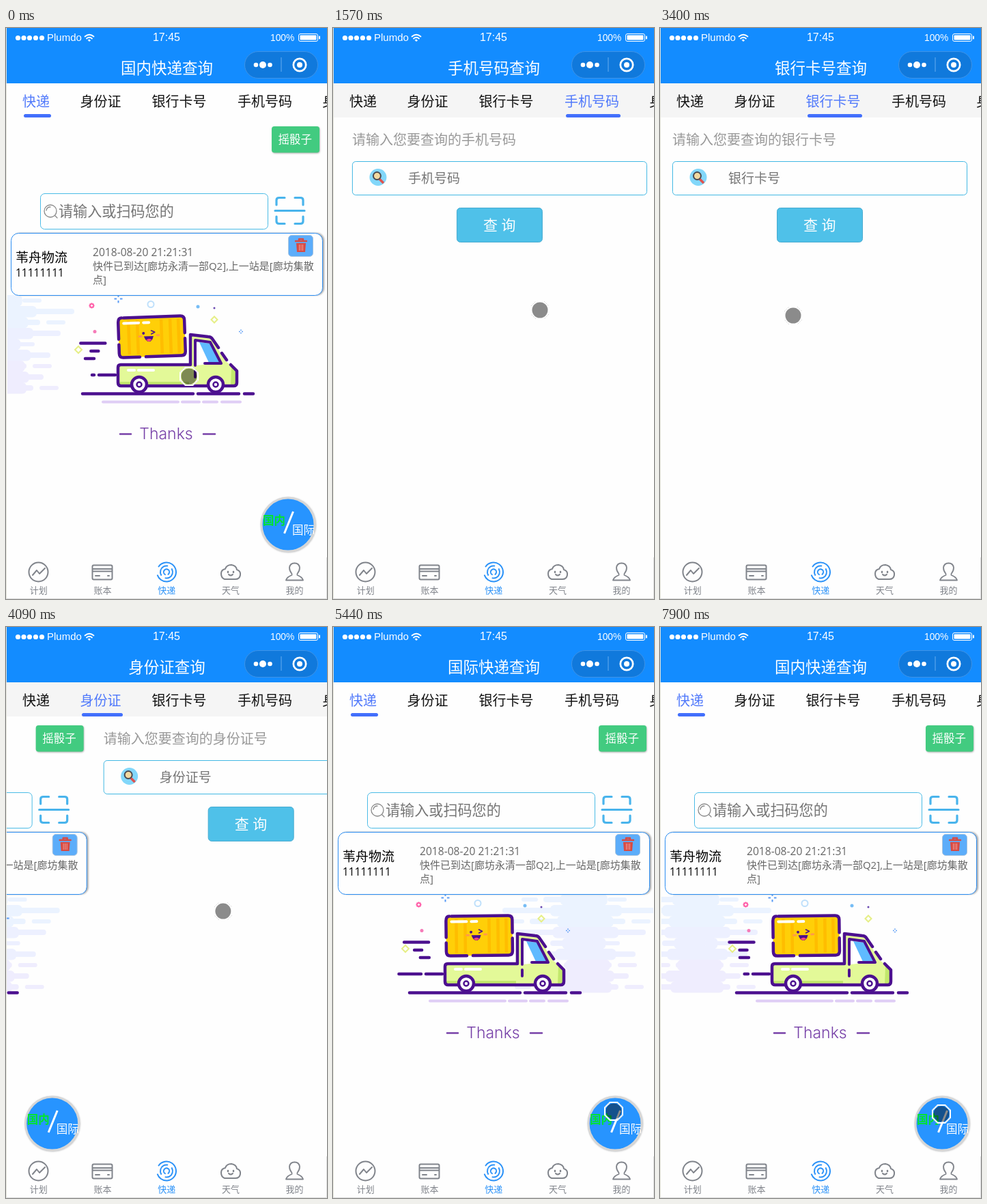
An HTML page that plays this animation: 470 by 836 pixels, repeating every 8 s.

```html
<!DOCTYPE html>
<html lang="zh">
<head>
<meta charset="utf-8">
<style>
html, body { margin: 0; width: 100%; height: 100%; overflow: hidden; background: #fefefe; }
svg { display: block; width: 470px; height: 836px; font-family: 'Open Sans', 'Noto Sans CJK SC', 'Noto Sans CJK', sans-serif; }
.bar { font-family: 'Liberation Sans', sans-serif; fill: #fff; }
.line { fill: none; stroke-linecap: round; stroke-linejoin: round; }
</style>
</head>
<body>
<svg viewBox="0 0 470 836">
  <defs>
    <clipPath id="view"><rect x="1" y="131" width="469" height="644"/></clipPath>
    <clipPath id="art"><rect x="2" y="391" width="467" height="180"/></clipPath>
    <filter id="soft" x="-20%" y="-20%" width="140%" height="140%"><feGaussianBlur stdDeviation="1.2"/></filter>
  </defs>
  <rect width="470" height="836" fill="#fefefe"/>

  <g clip-path="url(#view)"><g id="pages">
    <g clip-path="url(#art)">
      <g id="cloud"></g>
      <g id="sparks"></g>
    </g>
    <g id="truck" class="line" stroke="#4c108f" stroke-width="4.5">
      <path id="speed"/>
      <path d="M112 535.5H274M281 535.5H341M349 535.5H362"/>
      <path d="M142 547.5H252M258 547.5H283M289 547.5H309M316 547.5H343" stroke="#dfcdf5" stroke-width="4"/>
      <path d="M164 494H270V449L299 453Q311 470 322 488L338 501V524H164Z" fill="#e3f998" stroke="none"/>
      <path d="M166 518H268V524H166ZM330 497L338 501V524H329Z" fill="#c2e86c" stroke="none"/>
      <path d="M183 524H168Q164 524 164 519V497Q164 493 168 493H269M208 524H294M320 524H334Q338 524 338 519V502L329 493M323 486L316 476M311 468L302 455Q300 452 296 452L270 449V493"/>
      <path d="M278 458L299 461L314 490L279 494Z" fill="#fff" stroke="none"/>
      <path d="M283 460L299 462L312 489L298 492Z" fill="#5fbaff" stroke="none"/>
      <path d="M277 494V457L299 460L315 491H291M277 502V511" stroke-width="4"/>
      <path d="M179 501H188M194 501H216" stroke="#fff" stroke-width="4"/>
      <g fill="#fff"><circle cx="195" cy="522" r="11"/><circle cx="307" cy="522" r="11"/></g>
      <g fill="#fff" stroke-width="2.5"><circle cx="195" cy="522" r="3.5"/><circle cx="307" cy="522" r="3.5"/></g>
      <g id="box">
        <rect x="166" y="423" width="97" height="58" rx="3" fill="#ffcf08" stroke="none"/>
        <path d="M181 427V477M194 427V477M229 427V477M242 427V477M254 427V477" stroke="#ffbd00" stroke-linecap="butt"/>
        <path d="M174 423H257Q263 423 263 429V448M263 456V475Q263 481 257 481H205M196 481H172Q166 481 166 475V462M166 454V430Q166 423 171 423"/>
        <path d="M174 431H196M203 431H211" stroke="#fff" stroke-width="4"/>
        <path d="M214 443L219 445.500L214 448" stroke-width="1.6"/>
        <circle cx="202.500" cy="446.500" r="2" fill="#4c108f" stroke="none"/>
        <path d="M203 451H217Q215 459 210 459Q205 458 203 451Z" fill="#4c108f" stroke="none"/>
        <path d="M206 456.500Q211 453 214.500 456.500L210 459Z" fill="#ff4d79" stroke="none"/>
        <path d="M196 451H199M222 450H225" stroke="#ff9a4a" stroke-width="3"/>
      </g>
    </g>
    <path d="M167 594.5H183M289 594.5H306" class="line" stroke="#7740a8" stroke-width="2.6"/>
    <text x="234.5" y="601.5" font-size="23" font-weight="300" text-anchor="middle" fill="#7740a8" style="font-family:Inter,sans-serif">Thanks</text>

    <rect x="390" y="145" width="69.500" height="38.500" rx="4" fill="#aaa" filter="url(#soft)"/>
    <rect x="389" y="144" width="70" height="38.5" rx="4" fill="#42cb80"/>
    <text x="398.5" y="169" font-size="16.5" fill="#fff">摇骰子</text>

    <g id="firm">
      <text x="128" y="231" font-size="24">国际快递公司:</text>
      <text x="274" y="231" font-size="24" font-weight="700" fill="#83b8f0">ZKU</text>
      <path d="M274 234H323" stroke="#83b8f0" stroke-width="2"/>
      <path d="M324 217H342L333 227Z" fill="#4bb9e9"/>
    </g>
    <g class="line">
      <rect x="50.5" y="242.5" width="333" height="52" rx="6" stroke="#4abbe6"/>
      <g stroke="#888" stroke-width="1.3"><circle cx="65" cy="268" r="9"/><path d="M71.500 274.500L75 278M59 267Q60 262 65 262"/></g>
      <path d="M396 259V252Q396 248.500 400 248.500H408M423 248.500H431Q435 248.500 435 252V259M396 276V283Q396 286.500 400 286.500H408M423 286.500H431Q435 286.500 435 283V276M394 267.500H437" stroke="#49b4ec" stroke-width="3.2"/>
    </g>
    <text x="77" y="276" font-size="21.1" fill="#757575">请输入或扫码您的</text>

    <rect x="10" y="300" width="456" height="91.500" rx="11" fill="#aaa" filter="url(#soft)"/>
    <rect x="7.500" y="300.500" width="456" height="91" rx="11" fill="#fefefe" stroke="#2a8df2"/>
    <text x="14" y="343" font-size="19">苇舟物流</text>
    <text x="14" y="364" font-size="15.5">11111111</text>
    <g font-size="15" fill="#666">
      <text x="127" y="334" font-size="15.6">2018-08-20 21:21:31</text>
      <text x="127" y="354">快件已到达[廊坊永清一部Q2],上一站是[廊坊集散</text>
      <text x="127" y="374">点]</text>
    </g>
    <rect x="413.500" y="303.500" width="36" height="31" rx="5" fill="#5cadfa" stroke="#a9c4de"/>
    <path d="M424 312H440M429 311V309H435V311" class="line" stroke="#d84b43" stroke-width="2.4"/>
    <path d="M425 315H439L438 328H426Z" fill="#d84b43"/>
    <path d="M429.500 317V326M432 317V326M434.500 317V326" stroke="#f0a09a"/>

    <circle cx="413.500" cy="727.500" r="40.500" fill="#bbb" filter="url(#soft)"/>
    <circle cx="413" cy="727" r="39" fill="#2794ff" stroke="#d6d6d6" stroke-width="3"/>
    <path d="M420.500 708L407.500 740" stroke="#fff" stroke-width="3"/>
    <g font-size="16.5"><text id="home" x="376" y="727">国内</text><text id="abroad" x="419" y="741">国际</text></g>
    <g id="forms"></g>
  </g></g>

  <rect x="1" width="469" height="81" fill="#138cff"/>
  <g id="signal" fill="#fff"></g>
  <g class="bar">
    <text x="60" y="19" font-size="15">Plumdo</text>
    <text x="235" y="19" font-size="16" text-anchor="middle">17:45</text>
    <text x="387" y="19" font-size="13.800">100%</text>
  </g>
  <g class="line" stroke="#fff">
    <path d="M115.500 12.500Q122 7 128.500 12.500M118 15.500Q122 12 126 15.500" stroke-width="1.800"/>
    <path d="M120.500 18L122 19.500L123.500 18L122 17Z" fill="#fff"/>
    <rect x="428.500" y="8.500" width="28" height="11" rx="2.500"/>
    <rect x="430.500" y="10.500" width="24" height="7" rx="1" fill="#fff" stroke="none"/>
    <path d="M459 12.500V15.500" stroke-width="2"/>
  </g>
  <text id="title" x="235.500" y="67" font-size="22.5" font-weight="500" text-anchor="middle" fill="#fff"></text>
  <rect x="349.500" y="34.500" width="107" height="39" rx="19.500" fill="#1079dc" stroke="#3f93e6"/>
  <g fill="#fff"><circle cx="366" cy="54" r="3.300"/><circle cx="376" cy="54" r="5"/><circle cx="386.500" cy="54" r="3.300"/><circle cx="430" cy="54" r="4"/></g>
  <circle cx="430" cy="54" r="9.200" class="line" stroke="#fff" stroke-width="2.700"/>
  <path d="M403 43V64" stroke="#4a9cea" stroke-width="1.500"/>

  <rect id="strip" x="1" y="81" width="469" height="50"/>
  <g id="tabs" font-size="20"></g>
  <rect id="mark" y="126" height="5" rx="2.500" fill="#426ffc"/>

  <rect x="1" y="775" width="469" height="60" fill="#fefefe"/>
  <g class="line" stroke="#80848b" stroke-width="2">
    <circle cx="47.500" cy="796.500" r="14"/><path d="M39 801L45 794L49 799L57 791"/>
    <rect x="126.500" y="786.500" width="29" height="21" rx="2"/><path d="M127 792H155M127 795.500H155M131 802H137M149 802H151"/>
    <path d="M320 807Q315 805 315 799Q315 793 321 792Q323 786 330 786Q337 787 338 793Q344 795 343 801Q342 807 336 807ZM326 800Q329 803 332 800"/>
    <path d="M325 796V797M333 796V797" stroke-width="2.500"/>
    <path d="M418.500 799Q415 795 415 790Q416 783.500 422.500 783.500Q429 783.500 430 790Q430 795 426.500 799V801Q434 804 435 808.500H410Q411 804 418.500 801Z" stroke-width="1.800"/>
    <g stroke="#2b92f8"><circle cx="235" cy="796.500" r="14" stroke-dasharray="74 14" transform="rotate(215 235 796.500)"/><circle cx="235" cy="796.500" r="9" stroke-dasharray="20 8.300" transform="rotate(150 235 796.500)"/><circle cx="235" cy="796.500" r="4.200" stroke-dasharray="21 5.400" transform="rotate(120 235 796.500)"/></g>
  </g>
  <g id="nav" font-size="13" text-anchor="middle"></g>
  <path d="M.500 0V836" stroke="#e4e4da"/><path d="M0 835.500H470M469.500 775V836" stroke="#dcdcdc"/>

  <g id="cursor">
    <circle r="11.500" fill="#000" opacity=".45"/>
    <path d="M-5.500 -13H5.500L13 -5.500V5.500L5.500 13H-5.500L-13 5.500V-5.500Z" fill="none" stroke="#fff" stroke-width="2"/>
    <path d="M-13 -6L-6 -13M6 -13L13 -6M13 6L6 13M-6 13L-13 6" stroke="#ccc" stroke-width=".8" stroke-dasharray="2 1.500"/>
  </g>
</svg>
<script>
const $ = id => document.getElementById(id);
const set = (id, attrs) => { for (const k in attrs) $(id).setAttribute(k, attrs[k]); };
const clamp = v => Math.max(0, Math.min(1, v));
const tabs = [['快递', 24], ['身份证', 108.5], ['银行卡号', 213.5], ['手机号码', 339], ['身份', 463]];
const marks = [[26, 40], [111, 60], [216, 80], [341, 80]];

$('signal').innerHTML = [17.5, 26, 34.5, 43.5, 52.5].map(x => `<circle cx="${x}" cy="14.500" r="3.600"/>`).join('');
$('tabs').innerHTML = tabs.map(([s, x]) => `<text x="${x}" y="114.500">${s}</text>`).join('');
$('nav').innerHTML = ['计划', '账本', '快递', '天气', '我的'].map((s, i) =>
  `<text x="${47.8 + 93.7 * i}" y="828" fill="${i == 2 ? '#2b92f8' : '#80848b'}">${s}</text>`).join('');

$('forms').innerHTML = ['身份证号', '银行卡号', '手机号码'].map((s, i) => `<g transform="translate(${470 * (i + 1)})">
  <text x="18" y="171" font-size="20" fill="#999">请输入您要查询的${s}</text>
  <rect x="18.500" y="195.500" width="431" height="49" rx="5" fill="#fefefe" stroke="#42b8e4"/>
  <circle cx="56" cy="218.500" r="12.500" fill="#82d7fa"/>
  <path d="M58 221L64 227" stroke="#e0524d" stroke-width="3.500"/>
  <circle cx="54.500" cy="216.500" r="5.500" fill="#f3d9a0" stroke="#4a4a50" stroke-width="2"/>
  <text x="100" y="227" font-size="19" fill="#757575">${s}</text>
  <rect x="171.500" y="263.500" width="125" height="50" rx="5" fill="#4fc1e9" stroke="#47abd0"/>
  <text x="210" y="296" font-size="21" fill="#fff">查 询</text></g>`).join('');

// Cloud: a solid core with pale streaks at both ends
const bar = (x, y, w, h) => `<rect x="${x}" y="${y}" width="${w}" height="${h}" rx="${Math.min(h / 2, 6)}"/>`;
const left = [60, 0, 40, 15, 70, 30, 90, 20, 50], cut = [85, 0, 50, 20, 95, 35, 70, 45, 60];
$('cloud').innerHTML = left.map((l, i) => {
  const y = 391 + 16 * i, end = 230 - cut[i], core = 70 + l / 4;
  return `<g fill="${['#ebf3ff', '#edf0ff', '#efedfe'][i / 3 | 0]}">` + bar(core, y, 175 - cut[i] / 4 - core, 16.5) +
    bar(l, y + 4, end - l, 8) + (i % 2 ? '' : bar(end + 9, y + 5, 28, 6) + bar(l - 32, y + 5, 24, 6)) + '</g>';
}).join('');

const rays = (x, y, r, n, color, w = 2) => {
  let d = '';
  for (let i = 0; i < n; i++) {
    const c = Math.cos(i * 2 * Math.PI / n), s = Math.sin(i * 2 * Math.PI / n);
    d += `M${x + c * r * .4} ${y + s * r * .4}L${x + c * r} ${y + s * r}`;
  }
  return `<path d="${d}" stroke="${color}" stroke-width="${w}"/>`;
};
const ring = (x, y, r, color) => `<circle cx="${x}" cy="${y}" r="${r}" fill="none" stroke="${color}" stroke-width="2"/>`;
const dot = (x, y, r, color) => `<circle cx="${x}" cy="${y}" r="${r}" fill="${color}"/>`;
const gem = (x, y, r, color) => `<path d="M${x - r} ${y}l${r} ${-r}l${r} ${r}l${-r} ${r}z" fill="none" stroke="${color}" stroke-width="2"/>`;
const pink = '#ff4fa0', blue = '#5b9cf5', lime = '#e6ef86';
$('sparks').innerHTML = [
  rays(125.5, 406.5, 4, 8, pink) + rays(164.5, 396.5, 6, 4, blue) + ring(212, 404.5, 4.5, '#bfe0fb') + dot(281, 408, 2.5, '#77bdf5') +
    dot(305, 410, 1.5, '#6a48b0') + gem(305, 427, 4.5, lime) + rays(344, 444.5, 3, 4, blue, 1.5) + dot(130, 444.5, 2.5, '#f57bb8') + gem(106, 471, 5, lime),
  rays(133.5, 414, 8, 8, pink) + rays(163, 395, 4, 4, '#9cc6fa') + ring(236, 395, 4.5, '#bfdcfb') + dot(298, 399, 1.5, '#6a48b0') + dot(279, 428, 2.5, '#9cd0f8') +
    rays(343, 426.5, 7, 4, blue) + gem(320, 452, 4, '#f0f4b0') + dot(146, 435, 2.2, pink) + gem(92, 491.5, 7, lime),
  rays(133.5, 414, 8, 8, pink) + rays(202, 404, 5, 4, blue) + rays(273, 398, 4, 4, blue, 1.5) + dot(279, 428, 2.5, '#9cd0f8') + dot(314, 436, 1.5, '#6a48b0') +
    gem(336, 443, 4.5, lime) + dot(146, 435, 2.2, pink) + ring(84, 456, 3, '#eef4b8')
].map(s => `<g>${s}</g>`).join('');

// press, release, rest, direction
const swipes = [[250, 500, 760, 1], [760, 890, 1150, 1], [1180, 1390, 1655, 1],
  [2260, 2600, 2900, -1], [3400, 3650, 3900, -1], [3910, 4100, 4360, -1]];
// time, x, y
const path = [[0, 268, 510], [250, 330, 480], [500, 160, 462], [760, 330, 455], [890, 160, 452], [1180, 345, 453], [1390, 190, 440],
  [1570, 303, 413], [1750, 303, 413], [2260, 180, 420], [2600, 350, 420], [3200, 195, 421], [3400, 195, 421], [3650, 365, 421],
  [3910, 200, 419], [4100, 360, 415], [4480, 280, 412], [4630, 257, 413], [4900, 300, 355], [5300, 402, 690], [5440, 411, 709],
  [5700, 412, 713], [8000, 412, 713]];
// time, turns of the scenery
const turns = [[0, 0], [4630, 6.33], [5440, 7.46], [6550, 9.06], [7900, 10.91], [8000, 11.05]];
const at = (keys, t, k = 1) => {
  const i = Math.max(1, keys.findIndex(p => p[0] >= t)), a = keys[i - 1], b = keys[i];
  return a[k] + (b[k] - a[k]) * clamp((t - a[0]) / (b[0] - a[0]));
};
const starts = [0, 120, 1180, 1570, 1720, 2260, 3400, 4480, 4630, 5440, 5590, 6550, 6670, 7750, 7900];

function draw(now) {
  const clock = now % 8000, start = starts.filter(s => s <= clock).pop();
  const t = start + 130 * Math.floor((clock - start) / 130);

  let page = 0, tab = 0;
  for (const [press, release, rest, dir] of swipes) {
    const drag = clamp((t - press) / (release - press)), glide = clamp((t - release) / (rest - release));
    page += dir * (.36 * drag + .64 * (1 - (1 - glide) ** 3));
    if (t >= release) tab += dir;
  }
  set('pages', { transform: `translate(${-470 * page})` });
  set('strip', { fill: tab ? '#f5f5f5' : '#fefefe' });
  set('mark', { x: marks[tab][0], width: marks[tab][1] });
  [...$('tabs').children].forEach((e, i) => e.setAttribute('fill', i == tab ? '#5079fb' : '#111'));

  const abroad = t >= 4100 && t < 7300, picked = t >= 6000 && t < 7300;
  $('title').textContent = (tab ? tabs[tab][0] : abroad ? '国际快递' : '国内快递') + '查询';
  const on = { fill: '#00e62b', 'font-weight': 700 }, off = { fill: '#fff', 'font-weight': 400 };
  set('home', picked ? off : on);
  set('abroad', picked ? on : off);
  set('firm', { visibility: t >= 6000 && t < 7750 ? 'visible' : 'hidden' });

  const turn = at(turns, t), wave = shift => Math.cos(2 * Math.PI * (turn - shift));
  set('cloud', { transform: `translate(${470 - (600 + 700 * turn) % 700})` });
  set('box', { transform: `rotate(${-4 * ((1 + wave(.18)) / 2) ** 2} 214 481)` });
  const x = 103 + 14 * wave(.2), y = 122 - 6 * wave(0);
  set('speed', { d: `M${x + 2} 461.500h36M${x + 17} 473h11M${y} 484h13M${111 + 15 * wave(0)} 508H129M136 508H160` });
  const beat = turn % .5, look = beat < .03 || beat > .38 ? 0 : beat < .25 ? 1 : 2;
  [...$('sparks').children].forEach((e, i) => e.setAttribute('visibility', i == look ? 'visible' : 'hidden'));

  set('cursor', { transform: `translate(${at(path, t)} ${at(path, t, 2)})` });
}
const began = performance.now();
(function loop() {
  draw(performance.now() - began);
  requestAnimationFrame(loop);
})();
</script>
</body>
</html>
```
